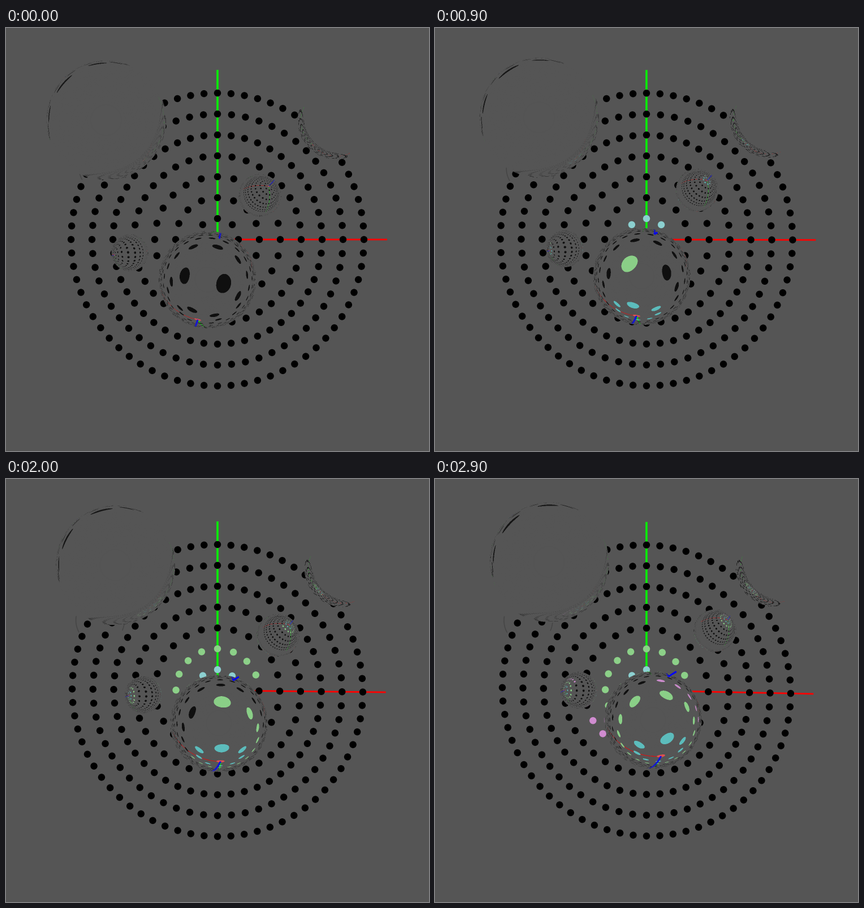
These frames come from a looping animation (748 by 748 pixels, 3000 ms). A matplotlib script:

```python
import numpy as np
import matplotlib.pyplot as plt
from matplotlib.animation import FuncAnimation

SIZE, MID, DPI = 748, 374, 100
FRAMES, INTERVAL = 30, 100
GREY = 85 / 255
GAP, DOT, AXIS = 37, 6.2, 300    # ring spacing, dot radius, axis length
THIN = 1.5                       # half width of an axis
INDEX = 1.45                     # refractive index of the glass
BLUE = (0, 0, 1)

COUNT = np.array([1, 8, 16, 24, 36, 48, 56, 68])
START = np.concatenate([[0, 0], np.cumsum(COUNT[1:-1])])


def palette(*colors):
    """One colour per ring; the last one serves all outer rings."""
    rows = list(colors) + [colors[-1]] * (len(COUNT) - len(colors))
    return np.array(rows, dtype=np.float32) / 255


DIRECT = palette((255, 80, 80), (140, 208, 208), (140, 208, 136), (208, 140, 208))
THROUGH = palette((255, 80, 80), (94, 211, 211), (150, 235, 147), (230, 152, 230))

# screen x, screen y at the start, height above the plane, radius, mirror?
BALLS = [
    (356.5, 445, 178, 86, False),
    (177, 163, 133, 106, False),
    (219, 397.5, 203, 32.5, False),
    (449, 296, 292, 37.5, False),
    (584, 164, 120, 68, True),
]


def camera(n):
    """Right, up and backward vectors of the orthographic camera."""
    a = np.arcsin((4.3 + 1.67 * n) / AXIS)
    b = np.arcsin((3 + 1.07 * n) / AXIS)
    right = np.array([np.cos(a), 0, np.sin(a)])
    back = np.array([-np.cos(b) * np.sin(a), -np.sin(b), np.cos(b) * np.cos(a)])
    return right, np.cross(back, right), back


def project(points, cam):
    points = np.asarray(points, dtype=float)
    return np.stack([MID + points @ cam[0], MID - points @ cam[1]], axis=-1)


def locate(sx, sy, height):
    """Point in space at the given height seen at a place of the first view."""
    right, up, back = camera(0)
    p = (sx - MID) * right + (MID - sy) * up
    return p + back * (height - p[2]) / back[2]


CENTERS = [locate(*ball[:3]) for ball in BALLS]
HIDDEN = locate(172, 247, -63)   # ball behind the plane, only its rim shows
HIDDEN_R = 43


def ring_points():
    rows = []
    for k, m in enumerate(COUNT):
        phi = 2 * np.pi * np.arange(m) / m
        rows.append(np.stack([-np.sin(phi), -np.cos(phi), 0 * phi], axis=1) * GAP * k)
    return np.concatenate(rows)


POINTS = ring_points()
RING = np.repeat(np.arange(len(COUNT)), COUNT)
ORDER = np.concatenate([START[k] + np.arange(m) for k, m in enumerate(COUNT)])


def dot_colors(ring, order, n, colors):
    lit = (ring == 0) | (order < n)
    return colors[ring] * lit[:, None]


def on_blue(p, d, reach):
    """Does the ray pass through the upright axis within its reach?"""
    flat = np.maximum(d[:, 0] ** 2 + d[:, 1] ** 2, 1e-9)
    t = -(p[:, 0] * d[:, 0] + p[:, 1] * d[:, 1]) / flat
    miss = (p[:, 0] + t * d[:, 0]) ** 2 + (p[:, 1] + t * d[:, 1]) ** 2
    z = p[:, 2] + t * d[:, 2]
    return (miss < THIN ** 2) & (t > 0) & (t < reach) & (z > 0) & (z < AXIS)


def shade(p, d, n):
    """Colour of the plane met by each ray."""
    col = np.full(p.shape, GREY, dtype=np.float32)
    t = -p[:, 2] / np.minimum(d[:, 2], -1e-4)
    x, y = p[:, 0] + t * d[:, 0], p[:, 1] + t * d[:, 1]
    hit = np.flatnonzero((d[:, 2] < -1e-3) & (x * x + y * y < (AXIS + 5) ** 2))
    x, y = x[hit], y[hit]
    sub = col[hit]
    sub[(np.abs(y) < THIN) & (x > 0) & (x < AXIS)] = (1, 0, 0)
    sub[(np.abs(x) < THIN) & (y > 0) & (y < AXIS)] = (0, 1, 0)

    k = np.minimum(np.rint(np.hypot(x, y) / GAP).astype(int), len(COUNT) - 1)
    m = COUNT[k]
    step = 2 * np.pi / m
    i = np.rint(np.arctan2(-x, -y) / step).astype(int) % m
    dx, dy = x + GAP * k * np.sin(i * step), y + GAP * k * np.cos(i * step)
    dot = dx * dx + dy * dy < DOT ** 2
    sub[dot] = dot_colors(k[dot], (START[k] + i)[dot], n, THROUGH)
    col[hit] = sub
    return col


def trace_glass(p, normal, facing, back, r, n):
    f = facing[:, None]
    eta = 1 / INDEX
    bend = np.sqrt(1 - eta ** 2 * (1 - f ** 2))
    inner = -eta * back + (eta * f - bend) * normal
    way = 2 * r * bend
    out = p + inner * way
    normal2 = normal + inner * (way / r)
    leave = INDEX * inner - (INDEX * bend - f) * normal2
    col = shade(out, leave, n)
    col[on_blue(p, inner, way[:, 0]) | on_blue(out, leave, np.inf)] = BLUE
    return col


def paint_ball(img, center, r, mirror, cam, n):
    right, up, back = (v.astype(np.float32) for v in cam)
    cx, cy = project(center, cam)
    x0, y0 = int(cx - r) - 1, int(cy - r) - 1
    size = int(2 * r) + 4
    grid = (np.arange(2 * size) + 0.5) / 2
    u, v = np.meshgrid((x0 + grid - cx) / r, (cy - y0 - grid) / r)
    inside = u * u + v * v < 0.9995
    u, v = u[inside].astype(np.float32), v[inside].astype(np.float32)

    facing = np.sqrt(1 - u * u - v * v)
    normal = u[:, None] * right + v[:, None] * up + facing[:, None] * back
    p = center.astype(np.float32) + r * normal
    bounce = 2 * facing[:, None] * normal - back
    col = shade(p, bounce, n)
    if not mirror:
        share = (0.18 + 0.82 * (1 - facing) ** 5)[:, None]
        passed = trace_glass(p, normal, facing, back, r, n)
        col = share * col + (1 - share) * passed

    tile = np.zeros((2 * size, 2 * size, 4), dtype=np.float32)
    tile[inside, :3] = col
    tile[inside, 3] = 1
    tile = tile.reshape(size, 2, size, 2, 4).mean(axis=(1, 3))
    tile[..., :3] /= np.maximum(tile[..., 3:], 1e-6)
    img[y0:y0 + size, x0:x0 + size] = np.clip(tile, 0, 1) * 255


def arc(center, start, stop):
    a = np.radians(np.linspace(start, stop, 20))
    return center[0] + HIDDEN_R * np.cos(a), center[1] + HIDDEN_R * np.sin(a)


def line(color, z, width):
    return ax.plot([], [], color=color, lw=width * 72 / DPI, zorder=z,
                   solid_capstyle="butt", snap=False)[0]


fig = plt.figure(figsize=(SIZE / DPI, SIZE / DPI), dpi=DPI, facecolor=(GREY,) * 3)
ax = fig.add_axes([0, 0, 1, 1])
canvas = np.zeros((SIZE, SIZE, 4), dtype=np.uint8)
balls = ax.imshow(canvas, extent=(0, SIZE, SIZE, 0), interpolation="nearest",
                  zorder=4, aspect="auto")
dots = ax.scatter(*project(POINTS, camera(0)).T, s=(2 * DOT * 72 / DPI) ** 2,
                  c=np.zeros((len(POINTS), 3)), linewidths=0, zorder=3)
red, green, blue = line((1, 0, 0), 2, 2.8), line((0, 1, 0), 2, 3.5), line(BLUE, 5, 3)
rims = [line("#454545", 1, 1.5) for _ in range(2)]
ax.set_xlim(0, SIZE)
ax.set_ylim(SIZE, 0)
ax.axis("off")

# the upright axis comes out of the large ball at this height
POLE = CENTERS[0][2] + np.sqrt(BALLS[0][3] ** 2 - np.sum(CENTERS[0][:2] ** 2))


def update(n):
    cam = camera(n)
    dots.set_offsets(project(POINTS, cam))
    dots.set_facecolor(dot_colors(RING, ORDER, n, DIRECT))
    red.set_data(*project([(0, 0, 0), (AXIS, 0, 0)], cam).T)
    green.set_data(*project([(0, 0, 0), (0, AXIS, 0)], cam).T)
    blue.set_data(*project([(0, 0, POLE), (0, 0, AXIS)], cam).T)
    hidden = project(HIDDEN, cam)
    for rim, span in zip(rims, [(150, 190), (5, 25)]):
        rim.set_data(*arc(hidden, *span))
    canvas[:] = 0
    for center, ball in zip(CENTERS, BALLS):
        paint_ball(canvas, center, ball[3], ball[4], cam, n)
    balls.set_data(canvas)
    return balls, dots, red, green, blue, *rims


anim = FuncAnimation(fig, update, frames=FRAMES, interval=INTERVAL,
                     repeat=True, repeat_delay=0)
plt.show()
```
